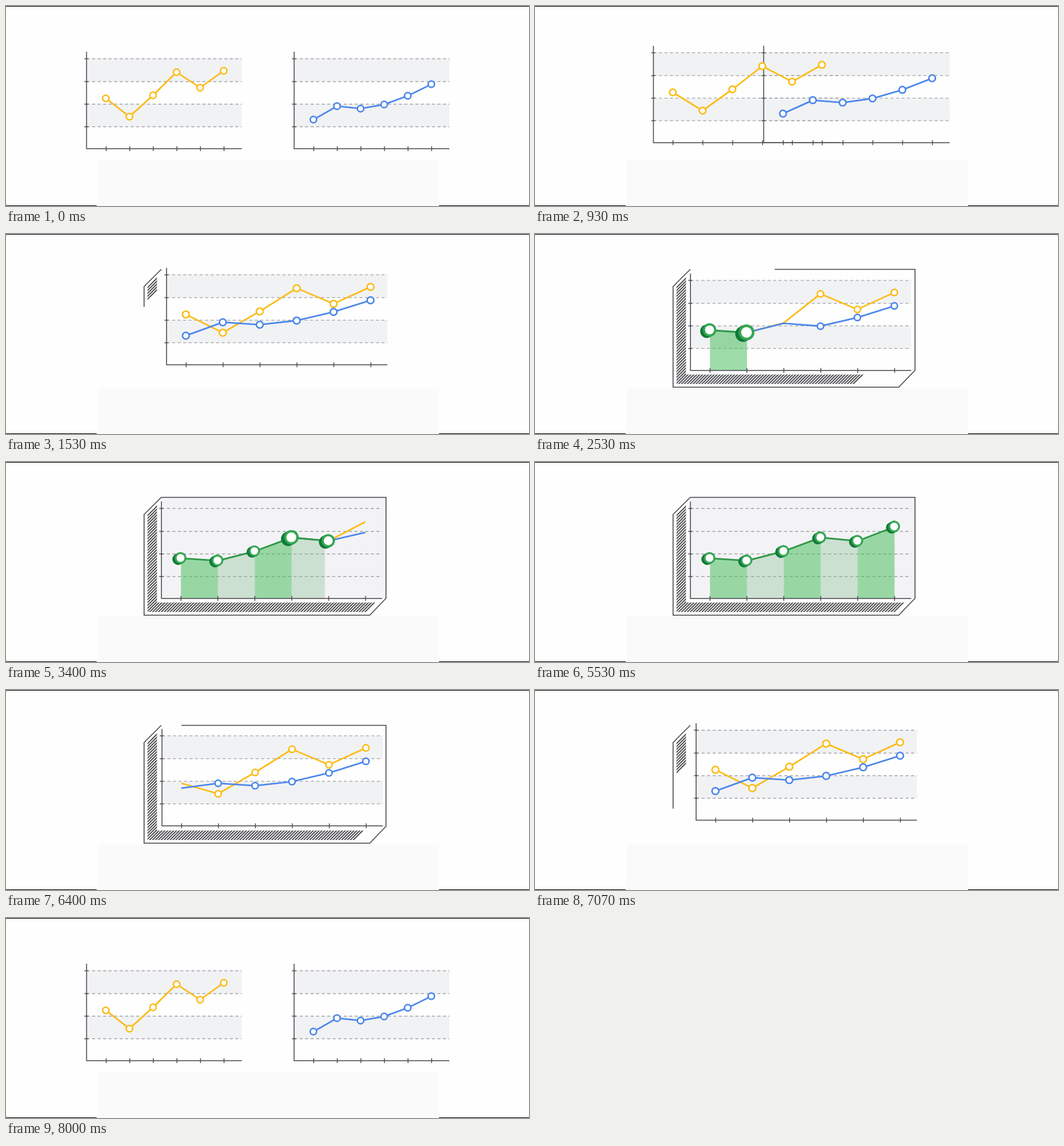
Recreate the animation shown at these times as an HTML page with a canvas. Size 854x328 px, loop 8.13 s.

```html
<!DOCTYPE html>
<html lang="en">
<head>
<meta charset="utf-8">
<title>Two charts become one</title>
<style>
  html, body { margin: 0; width: 100%; height: 100%; overflow: hidden; background: #fefefe; }
  canvas { display: block; width: 854px; height: 328px; }
</style>
</head>
<body>
<canvas id="stage"></canvas>
<script>
const W = 854, H = 328, LOOP = 8130;
const INK = '#4c4c50', YELLOW = '#fbbc16', BLUE = '#4a86ea';
const GREEN = '#34a853', DEEP = '#0f7a38';
const GRID = [11.5, 49, 86, 123], FLOOR = 159;
const HATCH_STEP = 4.75;
const yellowY = [76.5, 106.5, 71.5, 33.5, 59, 31.3];
const blueY = [111.3, 89.3, 93.3, 86.5, 72.3, 53.3];
const FRAME = [[253.5, 58], [225.5, 86], [225.5, 251.3], [594, 251.3], [620.5, 223.5], [620.5, 58], [253.5, 58]];
const FRAME_LEN = FRAME.slice(1).reduce((sum, p, i) => sum + Math.hypot(p[0] - FRAME[i][0], p[1] - FRAME[i][1]), 0);

const canvas = document.getElementById('stage');
const g = canvas.getContext('2d');
const dpr = window.devicePixelRatio || 1;
canvas.width = Math.round(W * dpr);
canvas.height = Math.round(H * dpr);

const mix = (a, b, k) => a + (b - a) * k;
const ramp = (t, a, b) => Math.min(1, Math.max(0, (t - a) / (b - a)));
const ease = (t, a, b) => (1 - Math.cos(Math.PI * ramp(t, a, b))) / 2;
// Rises over a..b, falls back over c..d.
const swing = (t, a, b, c, d) => ease(t, a, b) - ease(t, c, d);

function stroke(points, color, width) {
  g.beginPath();
  points.forEach(([x, y]) => g.lineTo(x, y));
  g.strokeStyle = color;
  g.lineWidth = width;
  g.stroke();
}

function backdrop() {
  g.fillStyle = '#fefefe';
  g.fillRect(0, 0, W, H);
  g.fillStyle = '#000';
  g.fillRect(0, 0, W, 1);
  g.fillRect(0, H - 1, W, 1);
  g.fillStyle = '#fafafa';
  g.fillRect(148, H - 1, 558, 1);
  g.fillRect(150, 253, 557, 75);
}

function bands(x, y, w, alpha) {
  g.globalAlpha = alpha;
  g.fillStyle = '#f1f2f4';
  g.fillRect(x, y + GRID[0], w, GRID[1] - GRID[0]);
  g.fillRect(x, y + GRID[2], w, GRID[3] - GRID[2]);
  g.globalAlpha = 1;
}

function grid(x, y, w) {
  g.setLineDash([5, 4]);
  for (const gy of GRID) stroke([[x, y + gy], [x + w, y + gy]], '#a3a5a8', 1.4);
  g.setLineDash([]);
}

function axes(x, y, w, xs) {
  stroke([[x, y], [x, y + FLOOR], [x + w, y + FLOOR]], INK, 1.5);
  for (const gy of GRID) stroke([[x - 3.5, y + gy], [x + 3, y + gy]], INK, 1.4);
  for (const px of xs) stroke([[px, y + FLOOR - 4], [px, y + FLOOR + 4]], INK, 1.4);
}

function dot(x, y, r, color) {
  if (r < 0.2) return;
  g.beginPath();
  g.arc(x, y, r, 0, 7);
  g.fillStyle = '#fff';
  g.fill();
  g.strokeStyle = color;
  g.lineWidth = Math.min(2.5, r);
  g.stroke();
}

function coin(x, y, k) {
  if (k < 0.02) return;
  const r = 9.4 * k;
  g.lineCap = 'round';
  stroke([[x, y], [x - 4 * k, y + 2 * k]], DEEP, 2 * r);
  g.lineCap = 'butt';
  for (const [radius, color] of [[r, GREEN], [6.4 * k, '#fff']]) {
    g.beginPath();
    g.arc(x, y, radius, 0, 7);
    g.fillStyle = color;
    g.fill();
  }
}

function coinScale(phase) {
  return 1.38 * ease(phase, 40, 330) - 0.45 * ease(phase, 420, 820) + 0.07 * ease(phase, 820, 950);
}

function box(progress) {
  let left = progress * FRAME_LEN;
  if (left <= 0) return;
  const path = [FRAME[0]];
  for (let i = 1; i < FRAME.length && left > 0; i++) {
    const [ax, ay] = FRAME[i - 1], [bx, by] = FRAME[i];
    const len = Math.hypot(bx - ax, by - ay), k = Math.min(1, left / len);
    path.push([mix(ax, bx, k), mix(ay, by, k)]);
    left -= len;
  }
  stroke(path, INK, 1.6);
}

function hatch(progress) {
  if (progress <= 0) return;
  g.save();
  g.beginPath();
  g.rect(231, 70, 15.5, 176);
  g.rect(231, 230.5, 380, 15.5);
  g.clip();
  for (let d = 0; d <= progress * 517; d += HATCH_STEP) {
    const x = 231 + Math.max(0, d - 158), y = 88 + Math.min(158, d);
    stroke([[x - 1, y + 1], [x + 16.5, y - 16.5]], INK, 1.8);
  }
  g.restore();
}

function draw(t) {
  const merge = swing(t, 470, 1430, 7170, 8010);
  const drop = swing(t, 1200, 2600, 6200, 7200);
  const face = swing(t, 2550, 3100, 5850, 6350);
  // Clock of the green stage, run backwards at speed on the way out.
  const clock = t < 5530 ? t : mix(4420, 1600, ramp(t, 5530, 6500));
  const phase = i => clock - 1910 - 310 * i;

  const w = mix(253.5, 360.5, merge), gap = mix(38.5, 60.3, merge);
  const y = mix(75, 54, merge) + 10.7 * drop;
  const lefts = [131.5, 470.5].map(x => mix(x, 263.5, merge) - 9.8 * drop);
  const slots = lefts.map(x => yellowY.map((_, i) => x + 32 + gap * i));
  const xs = slots[0];
  const mid = i => y + (yellowY[i] + blueY[i]) / 2 - 0.8;

  g.setTransform(dpr, 0, 0, dpr, 0, 0);
  g.lineJoin = 'miter';
  backdrop();

  if (face > 0) {
    g.globalAlpha = face;
    g.fillStyle = '#f3f3f5';
    g.fillRect(253.5, 58, 367, 165.5);
    g.globalAlpha = 1;
  }
  const panels = merge < 1 ? lefts : [lefts[0]];
  panels.forEach(x => bands(x, y, w, 1 - face));
  panels.forEach(x => grid(x, y, w));

  // Shaded columns follow the green line.
  const reach = i => ramp(phase(i), 0, 280);
  for (let i = 1; i < 6; i++) {
    const k = reach(i);
    if (!k) continue;
    const x0 = xs[i - 1], x1 = mix(x0, xs[i], k), top = mix(mid(i - 1), mid(i), k);
    g.beginPath();
    g.moveTo(x0, mid(i - 1));
    g.lineTo(x1, top);
    g.lineTo(x1, y + FLOOR);
    g.lineTo(x0, y + FLOOR);
    g.fillStyle = i % 2 ? 'rgba(70,190,90,.52)' : 'rgba(128,186,140,.35)';
    g.fill();
  }
  panels.forEach((x, n) => axes(x, y, w, slots[n]));

  hatch(swing(t, 1330, 2900, 6270, 7270));
  box(swing(t, 1265, 2900, 6290, 7310));

  const radius = 5.2 + 0.4 * merge - 0.5 * drop;
  let first = 0;
  while (first < 5 && reach(first + 1) === 1) first++;
  [[yellowY, YELLOW], [blueY, BLUE]].forEach(([ys, color], n) => {
    const pts = ys.map((v, i) => [slots[n][i] - 0.5, mix(y + v, mid(i), ease(phase(i), -90, 10))]);
    g.lineJoin = 'round';
    if (first < 5) stroke(pts.slice(first), color, 2.6);
    pts.forEach(([px, py], i) => dot(px, py, radius * (1 - ease(phase(i), -300, -120)), color));
  });

  for (let i = 1; i < 6; i++) {
    const k = reach(i);
    if (k) stroke([[xs[i - 1], mid(i - 1)], [mix(xs[i - 1], xs[i], k), mix(mid(i - 1), mid(i), k)]], '#2f9848', 2.8);
  }
  xs.forEach((x, i) => coin(x - 0.7, mid(i) - 0.4, coinScale(phase(i))));
}

const start = performance.now();
function tick() {
  draw((performance.now() - start) % LOOP);
  requestAnimationFrame(tick);
}
tick();
</script>
</body>
</html>
```
